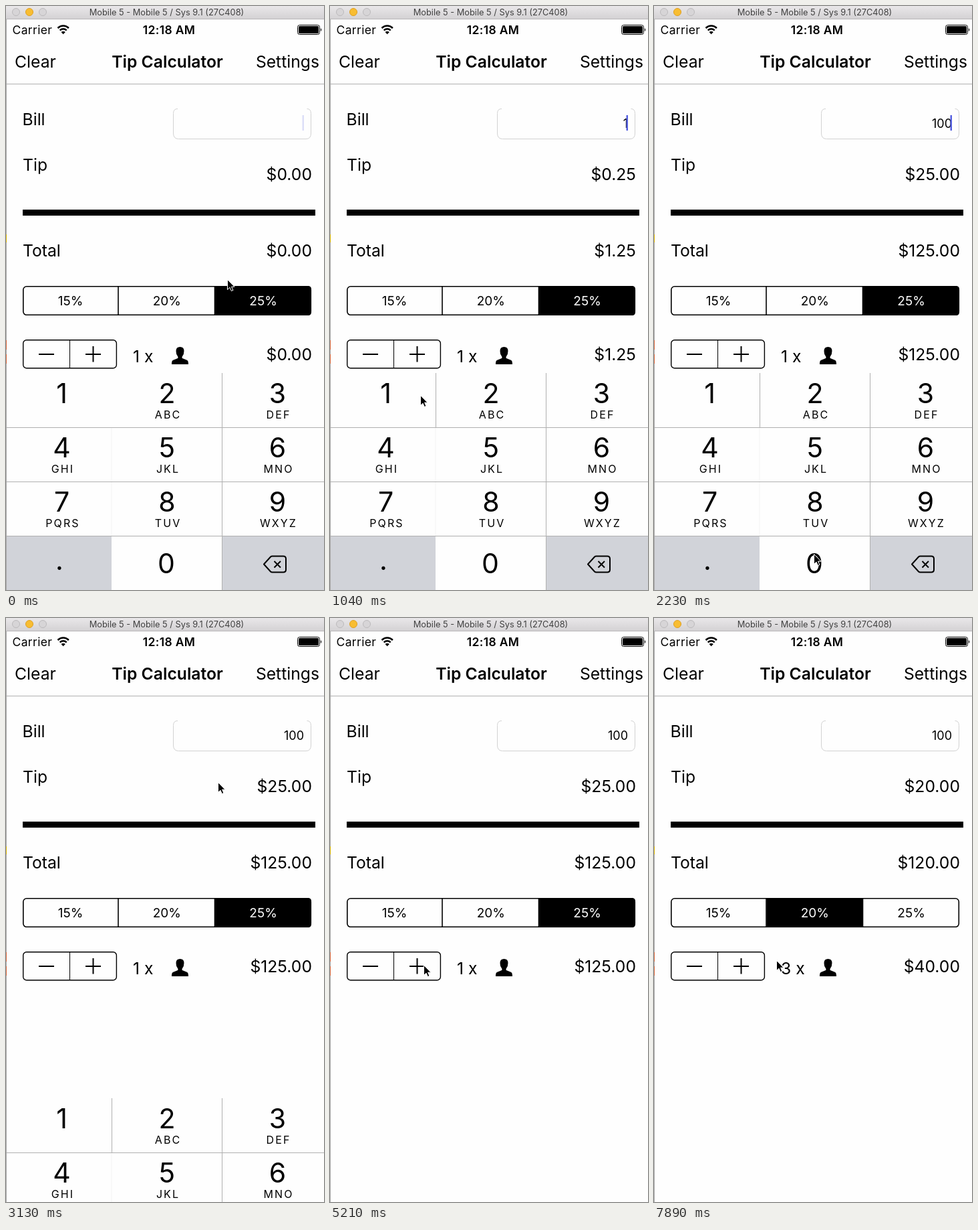
Write an HTML page that moves like this. It is 476 px wide and 872 px high and loops after 8 s.

```html
<!DOCTYPE html>
<html lang="en">
<head>
<meta charset="utf-8">
<title>Tip Calculator</title>
<style>
  html, body { margin: 0; width: 100%; height: 100%; overflow: hidden; background: #fefefe; }
  svg { display: block; width: 100%; height: 100%; font: 24.7px Inter, sans-serif; }
  .title { font-weight: 600; }
  .status { font-size: 17.5px; letter-spacing: .35px; }
  .window { font-size: 12.8px; fill: #404040; }
  .field { font-size: 18px; }
  .segment { font-size: 19px; }
  .digit { font-size: 41px; }
  .letters { font-size: 16px; letter-spacing: 2.1px; }
  .mid { text-anchor: middle; }
  .end { text-anchor: end; }
  .line { fill: none; stroke: #000; stroke-width: 1.6; }
  .rule { fill: none; stroke: #b0b0b0; }
</style>
</head>
<body>
<svg viewBox="0 0 476 872">
  <defs>
    <linearGradient id="chrome" x2="0" y2="1">
      <stop stop-color="#e9e7e9"/><stop offset="1" stop-color="#d3d1d3"/>
    </linearGradient>
  </defs>
  <rect width="476" height="872" fill="#fefefe"/>

  <!-- window edge and title bar -->
  <path d="M.5 20V872" stroke="#a8a8a8"/>
  <path d="M.5 341v12" stroke="#d9b400"/>
  <path d="M.5 499v14m0 7v14" stroke="#d9683c"/>
  <rect width="476" height="20" fill="url(#chrome)"/>
  <path d="M0 19.5H476" stroke="#b9b7b9"/>
  <g fill="#d7d5d7" stroke="#bcbabc">
    <circle cx="15" cy="9" r="5.5"/>
    <circle cx="35" cy="9" r="5.5" fill="#f8bd32" stroke="#dfa023"/>
    <circle cx="55" cy="9" r="5.5"/>
  </g>
  <text class="window mid" x="240.5" y="14">Mobile 5 - Mobile 5 / Sys 9.1 (27C408)</text>

  <!-- status bar -->
  <text class="status" x="9.5" y="42">Carrier</text>
  <path d="M77.5 33a11.5 11.5 0 0 1 16.4 0M80.7 36.4a7 7 0 0 1 10 0" class="line" style="stroke-width:2.5"/>
  <path d="M85.7 42.3l-3.1-3.2a4.4 4.4 0 0 1 6.2 0z"/>
  <text class="status title mid" x="244" y="42">12:18 AM</text>
  <rect x="436.5" y="28.5" width="33" height="14" rx="3" fill="none" stroke="#000"/>
  <rect x="438" y="30" width="30" height="11" rx="1.5"/>
  <path d="M471 33q2.5 2.5 0 5z"/>

  <!-- navigation bar -->
  <text x="13" y="92">Clear</text>
  <text class="title mid" x="241.5" y="92">Tip Calculator</text>
  <text class="end" x="469" y="92">Settings</text>
  <path class="rule" d="M1 116.5H476"/>

  <!-- amounts -->
  <text x="24.5" y="178">Bill</text>
  <text x="25" y="246">Tip</text>
  <text x="25" y="374">Total</text>
  <path d="M257 153.5q-6.5 0-6.5 7V190q0 8.5 8 8.5H449q7.5 0 7.5-8.5V160.500q0-7-6-7" fill="none" stroke="#d2d2d2"/>
  <text id="bill" class="field end" x="446" y="181.500"></text>
  <rect id="caret" x="443.500" y="163" width="2.500" height="23" fill="#5560e0"/>
  <text id="tip" class="end" x="458" y="260"></text>
  <rect x="25" y="304" width="438" height="9"/>
  <text id="total" class="end" x="458" y="374"></text>
  <text id="share" class="end" x="458" y="529"></text>

  <!-- tip rate -->
  <rect class="line" x="25.800" y="418.800" width="430.500" height="42.500" rx="5"/>
  <path class="line" d="M168 418V461M312.500 418V461"/>
  <g id="segments"></g>

  <!-- people -->
  <rect id="plusPressed" x="96" y="499" width="69" height="41" fill="#d9d9d9"/>
  <rect class="line" style="stroke-width:1.4" x="25.700" y="498.700" width="139.700" height="42" rx="5"/>
  <path d="M95.500 498V541" stroke="#000"/>
  <path class="line" style="stroke-width:2" d="M49 520H72M119 520H142M130.500 508V531.500"/>
  <text id="people" x="190" y="532"></text>
  <path d="M248 535c0-5 1-6 4-7l5-2q1-1 0-3-2.500-3-2.500-8 0-6 6-6t6 6q0 5-2.500 8-1 2 0 3l5 2c3 1 4 2 4 7z"/>

  <g id="keyboard"></g>
  <path id="pointer" d="M.5 .5V15.500l3.500-3.300 2.400 5.300 2.500-1.100-2.300-5.200H11z" stroke="#fff"/>
</svg>

<script>
const LOOP = 8000;
const TICK = 148.8; // the screen refreshes in coarse steps
const RATES = [15, 20, 25];
const $ = id => document.getElementById(id);

// Each point is [tick, value, ...]; values are linear between points.
const POINTER = [
  [0, 331, 408], [1, 325, 414], [3, 215, 520], [4, 148, 575], [5, 135, 581], [7, 135, 581],
  [8, 148, 605], [10, 232, 805], [11, 239, 818], [15, 239, 818], [16, 321, 328],
  [18, 319, 256], [19, 317, 245], [22, 317, 245], [25, 310, 420], [28, 252, 850],
  [30, 170, 600], [32, 78, 449], [34, 132, 510], [35, 140, 518], [46, 140, 518],
  [48, 215, 455], [49, 232, 440], [50, 232, 440], [53, 183, 511]
];
const CARET = [[0, .2], [1, 0], [3, 1], [17, 1], [19, 0]];
const SLIDE = [[20, 0], [21, 169], [22, 296], [23, 324]];

// Hard changes: the value holds from its tick on.
const BILL = [[0, ''], [6, '1'], [12, '10'], [14, '100']];
const PEOPLE = [[0, 1], [41, 2], [46, 3]];
const RATE = [[0, 25], [50, 20]];

function along(track, tick) {
  const next = track.findIndex(point => point[0] > tick);
  if (next < 0) return track.at(-1).slice(1);
  if (next === 0) return track[0].slice(1);
  const a = track[next - 1], b = track[next];
  const k = (tick - a[0]) / (b[0] - a[0]);
  return a.slice(1).map((v, i) => v + (b[i + 1] - v) * k);
}
const held = (steps, tick) => steps.findLast(step => step[0] <= tick)[1];
const money = value => '$' + value.toFixed(2);
const show = (id, visible) => $(id).setAttribute('visibility', visible ? 'visible' : 'hidden');

function buildKeyboard() {
  const columns = [83.5, 241, 406.5];
  const letters = ['', 'ABC', 'DEF', 'GHI', 'JKL', 'MNO', 'PQRS', 'TUV', 'WXYZ'];
  const keys = letters.map((label, i) => {
    const x = columns[i % 3], y = 593 + 81 * Math.floor(i / 3);
    return `<text class="digit mid" x="${x}" y="${y}">${i + 1}</text>
      <text class="letters mid" x="${x + 1.5}" y="${y + 22.5}">${label}</text>`;
  });
  $('keyboard').innerHTML = `
    <rect x="1" y="548" width="475" height="324" fill="#fefefe"/>
    <path d="M1 792H158V872H1zM324 792H476V872H324z" fill="#d1d3d9"/>
    <rect id="onePressed" x="1" y="548" width="157" height="81" fill="#d1d3d9"/>
    <rect id="zeroPressed" x="158" y="792" width="165" height="80" fill="#d1d3d9"/>
    <path d="M158 630V791" stroke="#f3f3f3"/>
    <path id="oneEdge" class="rule" d="M158.500 548V629"/>
    <path class="rule" d="M323.500 548V872M1 629.500H476M1 710.500H476M1 791.500H476"/>
    ${keys.join('')}
    <text class="digit mid" x="80" y="841.500">.</text>
    <text class="digit mid" x="240" y="847">0</text>
    <path class="line" style="stroke-width:2" stroke-linejoin="round"
      d="M386 833.500L396 822.500q1-1 2.500-1H415q4 0 4 4V841.500q0 4-4 4H398.500q-1.500 0-2.500-1zM401.500 829l9.500 9.500m0-9.500l-9.500 9.500"/>`;
}

function buildSegments() {
  $('segments').innerHTML = RATES.map((rate, i) => `
    <path id="fill${rate}" d="${i < 2
      ? `M${25 + 143.500 * i} 418h144v44h-144z`
      : 'M312 418H452q5 0 5 5V457q0 5-5 5H312z'}"/>
    <text id="rate${rate}" class="segment mid" x="${96.500 + 144.300 * i}" y="447">${rate}%</text>`).join('');
}

function draw(tick) {
  const bill = held(BILL, tick), people = held(PEOPLE, tick), rate = held(RATE, tick);
  const tip = bill * rate / 100, total = +bill + tip;
  $('bill').textContent = bill;
  $('tip').textContent = money(tip);
  $('total').textContent = money(total);
  $('share').textContent = money(total / people);
  $('people').textContent = people + ' x';

  for (const r of RATES) {
    show('fill' + r, r === rate);
    $('rate' + r).setAttribute('fill', r === rate ? '#fff' : '#000');
  }
  show('plusPressed', tick === 41);
  show('onePressed', tick === 5);
  show('zeroPressed', tick === 11 || tick === 13);
  show('oneEdge', tick >= 5);

  $('caret').setAttribute('opacity', along(CARET, tick)[0]);
  $('keyboard').setAttribute('transform', `translate(0 ${along(SLIDE, tick)[0]})`);
  $('pointer').setAttribute('transform', `translate(${along(POINTER, tick)})`);
}

function frame() {
  draw(Math.floor(performance.now() % LOOP / TICK));
  requestAnimationFrame(frame);
}

buildKeyboard();
buildSegments();
frame();
</script>
</body>
</html>
```
